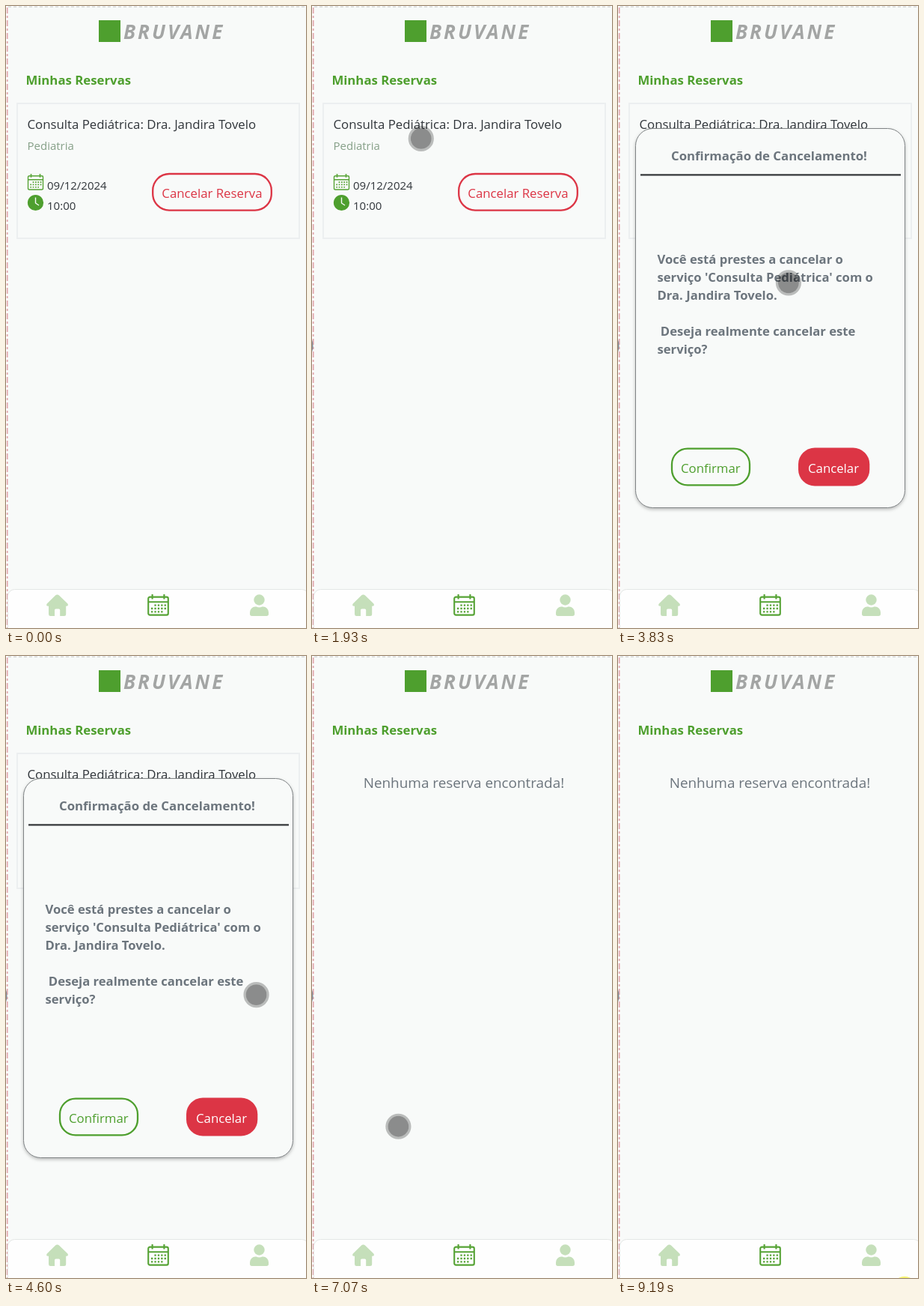
Write an HTML page that moves like this. It is 401 by 830 pixels and loops after 9240 ms.

```html
<!DOCTYPE html>
<html lang="pt">
<head>
<meta charset="utf-8">
<title>Minhas Reservas</title>
<style>
  html, body { margin: 0; width: 100%; height: 100%; overflow: hidden; background: #f8faf9; }
  svg { display: block; width: 401px; height: 830px; }
  text { font-family: "Open Sans", "Noto Sans", sans-serif; font-size: 16.8px; white-space: pre; }
  .bold { font-weight: 700; }
  .dark { fill: #30353a; }
  .grey { fill: #6c757d; }
  .green { fill: #4e9f2e; }
  .red { fill: #dc3545; }
  .pale { fill: #c5dfba; }
  .small { font-size: 15px; }
  .large { font-size: 18.9px; }
  .body { font-size: 16.65px; }
  .brand { font-size: 26px; font-weight: 700; font-style: italic; letter-spacing: 3px; fill: #a3a5a4; }
  .pill { fill: none; stroke-width: 2.3; }
  .panel { fill: #f8faf9; stroke: #7f8385; filter: drop-shadow(0 2px 2px rgba(0, 0, 0, .25)); }
</style>
</head>
<body>
<svg viewBox="0 0 401 830">
  <defs>
    <symbol id="calendar" viewBox="0 0 29 29">
      <g fill="none" stroke="#56a335" stroke-width="2.1">
        <rect x="1.2" y="3.6" width="26.6" height="24" rx="2.2"/>
        <path d="M1.2 10.2H27.8M6.6 0V6.4M22.4 0V6.4"/>
        <path d="M9.4 14.6H25M5 19H25M5 23.4H21" stroke-width="2.3" stroke-dasharray="2.3 2.1"/>
      </g>
    </symbol>
  </defs>

  <rect width="401" height="830" fill="#f8faf9"/>
  <path d="M0 0H401V1H3V830H0Z" fill="#fdfdfd"/>
  <path d="M3 1.2H401" stroke="#cfd2d2" stroke-width="1.3" stroke-dasharray="4 3"/>
  <path d="M1.7 2V830" stroke="#e0a5aa" stroke-width="1.7" stroke-dasharray="8 3 3 3"/>

  <rect x="124" y="19" width="29" height="29" class="green"/>
  <text x="157" y="44" class="brand">BRUVANE</text>
  <text x="26.4" y="105" class="bold green">Minhas Reservas</text>

  <g id="card">
    <rect x="15" y="130" width="377" height="180" fill="none" stroke="#eceff0" stroke-width="2"/>
    <text x="28.5" y="164" class="dark">Consulta Pediátrica: Dra. Jandira Tovelo</text>
    <text x="28.5" y="192" class="small" fill="#86a088">Pediatria</text>
    <use href="#calendar" x="28.5" y="224" width="22" height="22"/>
    <text x="55" y="245" class="small dark">09/12/2024</text>
    <circle cx="39.5" cy="262.5" r="10.6" class="green"/>
    <path d="M39.5 255.5V263L44 266" fill="none" stroke="#f8faf9" stroke-width="1.4"/>
    <text x="55" y="272" class="small dark">10:00</text>
    <rect x="196.2" y="224" width="158.6" height="48.6" rx="22" class="pill" stroke="#dc3545"/>
    <text x="208.3" y="256" class="red">Cancelar Reserva</text>
  </g>

  <text id="empty" x="68.7" y="176" class="grey large">Nenhuma reserva encontrada!</text>

  <rect x="2.5" y="778.5" width="402" height="60" rx="9" fill="#fefefe" stroke="#e4e7e6"/>
  <path class="pale" d="M66 786.4Q68.5 784.4 71 786.4L82.4 797.4Q84 800.4 81 800.8H80.2V811.5Q80.2 814 77.7 814H72.2V806.2Q72.2 804.6 70.6 804.6H66.6Q65 804.6 65 806.2V814H59.4Q57 814 57 811.5V800.8H56Q53 800.4 54.8 797.4Z"/>
  <use href="#calendar" x="189" y="785" width="29" height="29"/>
  <circle cx="338.5" cy="792.5" r="7.2" class="pale"/>
  <path class="pale" d="M333.5 801.5H334.4Q338.5 803.4 342.6 801.5H343.5A7.5 7.5 0 0 1 351 809V811.3A2.7 2.7 0 0 1 348.3 814H328.7A2.7 2.7 0 0 1 326 811.3V809A7.5 7.5 0 0 1 333.5 801.5Z"/>

  <g id="modal">
    <rect x="23.5" y="163.5" width="360" height="506" rx="23" class="panel"/>
    <text x="71" y="206" class="bold grey">Confirmação de Cancelamento!</text>
    <path d="M30 225.3H378" stroke="#34373a" stroke-width="2.3"/>
    <g id="message"></g>
    <rect x="72" y="590.6" width="104" height="48.8" rx="21" class="pill" stroke="#4e9f2e"/>
    <text x="84" y="623" class="green">Confirmar</text>
    <rect x="241" y="589.5" width="95.3" height="51" rx="22" class="red"/>
    <text x="254" y="623" fill="#fff">Cancelar</text>
  </g>

  <path id="sliver" d="M0 445Q3 453.5 0 462Z" fill="#7f8994"/>
  <g id="cursor">
    <circle r="15.5" fill="none" stroke="#000" stroke-opacity=".25" stroke-width="3.2"/>
    <circle r="13.9" fill="#000" fill-opacity=".44"/>
  </g>
  <circle id="flash" cx="383" cy="845" r="17" fill="#f7f36e"/>
</svg>

<script>
const LOOP = 9240;
const MESSAGE = `Você está prestes a cancelar o
serviço 'Consulta Pediátrica' com o
Dra. Jandira Tovelo.

 Deseja realmente cancelar este
serviço?`;

// Where the pointer rests between glides
const EDGE = [-15, 453], CARD = [114, 179], BUTTON = [271, 250], TEXT = [347, 442];
const BELOW = [111, 634], CONFIRM = [111, 618], LOW = [180, 770];

// Each glide: start, end, then points passed at even intervals
const GLIDES = [
  [410, 710, [339, 826], EDGE],
  [830, 1780, EDGE, [65, 446], [83, 355], [68, 240], CARD],
  [1780, 2500, CARD, [170, 180], [240, 217], BUTTON],
  [3590, 4550, BUTTON, [228, 369], [222, 400], [272, 429], TEXT],
  [4550, 5150, TEXT, BELOW],
  [5270, 5420, BELOW, CONFIRM],
  [7020, 7530, CONFIRM, LOW],
  [7890, 8390, LOW, [362, 850]]
];

const el = id => document.getElementById(id);
const show = (id, on) => el(id).setAttribute('visibility', on ? 'visible' : 'hidden');
const clamp = v => Math.max(0, Math.min(1, v));

MESSAGE.split('\n').forEach((words, i) => {
  const line = document.createElementNS('http://www.w3.org/2000/svg', 'text');
  line.setAttribute('x', 52.5);
  line.setAttribute('y', 344 + 24 * i);
  line.setAttribute('class', 'bold grey body');
  line.textContent = words;
  el('message').append(line);
});

// Catmull-Rom curve through the points, u from 0 to 1
function curve(points, u) {
  const last = points.length - 1;
  const i = Math.min(last - 1, Math.floor(u * last));
  const f = u * last - i;
  const at = n => points[Math.max(0, Math.min(last, n))];
  return [0, 1].map(k => {
    const [a, b, c, d] = [-1, 0, 1, 2].map(n => at(i + n)[k]);
    return b + f / 2 * (c - a + f * (2 * a - 5 * b + 4 * c - d + f * (3 * (b - c) + d - a)));
  });
}

function pointer(t) {
  const [start, end, ...points] = GLIDES.findLast(g => t >= g[0]) || GLIDES[0];
  return curve(points, clamp((t - start) / (end - start)));
}

function modalOpacity(t) {
  return t < 6290 ? clamp((t - 2800) / 470) ** 2 : clamp((6440 - t) / 150);
}

function draw() {
  const t = performance.now() % LOOP;
  const alpha = modalOpacity(t);
  el('modal').setAttribute('opacity', alpha);
  show('modal', alpha > 0);
  show('card', t < 6460);
  show('empty', t >= 6460);
  show('sliver', t >= 710);
  show('cursor', t >= 405 && t < 8390);
  show('flash', t >= 9190);
  el('cursor').setAttribute('transform', `translate(${pointer(t)})`);
  requestAnimationFrame(draw);
}
draw();
</script>
</body>
</html>
```
